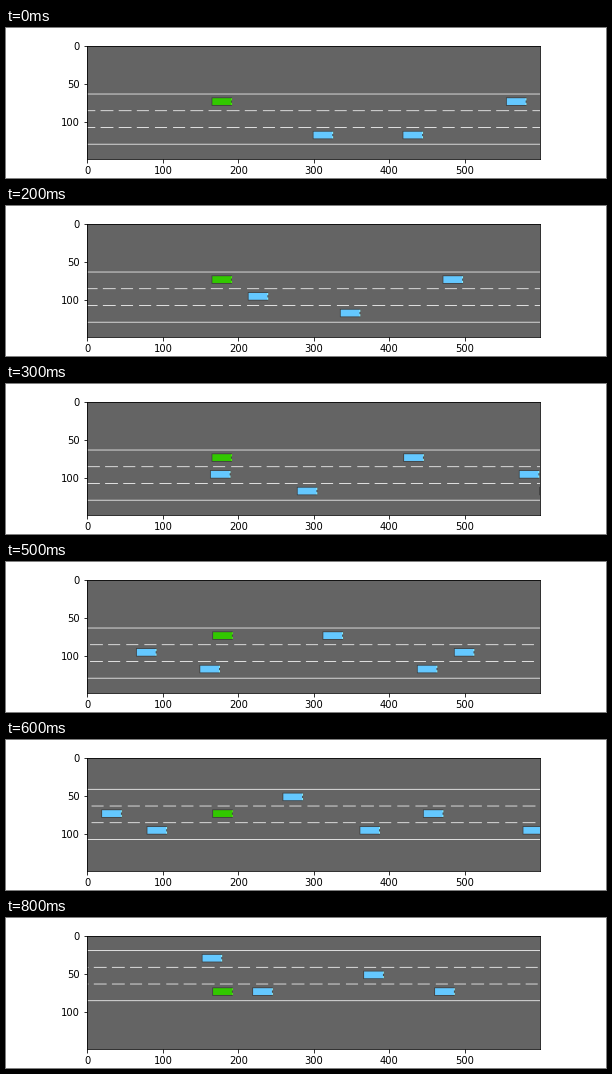
Write a matplotlib script that moves like this. It is 600x150 px and loops after 0.9 s.

```python
import matplotlib.pyplot as plt
import numpy as np
from matplotlib.animation import FuncAnimation

W, H = 600, 150
FRAMES, STEP = 9, 100
LANE = 22
CAR_L, CAR_W = 27, 11
DASH, PERIOD = 16.5, 23.815
CRUISE = 165  # own distance per step, in pixels

ROAD, WHITE, OUTLINE = (100, 100, 100), (255, 255, 255), (60, 60, 60)
GREEN, BLUE = (50, 200, 0), (100, 200, 255)

# Traffic: lane, start, closing speed, acceleration
CARS = [
    (2, 299, 56.5, 0.95),
    (2, 418, 49.0, -1.95),
    (0, 555, 53.5, 0),
    (1, 689, 49.1, 0.7),
    (2, 842, 94.3, 1.67),
    (2, 903, 58.5, 0),
]

Y, X = np.mgrid[:H, :W]


def lag(t):
    """Distance lost while the green car picks up speed."""
    return 25 * (1 - np.exp(-1.3 * t))


def paint_car(img, left, cy, color, heading=0.0):
    dx, dy = X - (left + CAR_L // 2), Y - cy
    u = dx * np.cos(heading) + dy * np.sin(heading)
    v = dy * np.cos(heading) - dx * np.sin(heading)
    body = (abs(u) < CAR_L / 2) & (abs(v) < CAR_W / 2)
    inner = (abs(u) < CAR_L / 2 - 1) & (abs(v) < CAR_W / 2 - 1)
    lamps = body & (u > CAR_L / 2 - 1) & (abs(v) > 1.5) & (abs(v) < 4.5)
    img[body] = OUTLINE
    img[inner] = color
    img[lamps] = [min(int(c / 0.68), 255) for c in color]


def paint_road(img, top, travel):
    dashes = (np.arange(W) + travel) % PERIOD < DASH
    for k in range(4):
        img[top + k * LANE, dashes if k in (1, 2) else slice(None)] = WHITE


def scene(t):
    img = np.full((H, W, 3), ROAD, dtype=np.uint8)
    own_lane = int(np.clip(t - 5, 0, 2))
    top = 64 - LANE * own_lane
    paint_road(img, top, 6 + CRUISE * t - lag(t))
    for n, (lane, start, speed, acc) in enumerate(CARS):
        heading = 0.0
        if n == 0:  # the leading car merges one lane up
            shift = 1 - np.exp(-1.7 * t * t)
            lane -= shift
            heading = -1.05 * shift * (1 - shift)
        left = start - speed * t + acc * t * t + lag(t)
        paint_car(img, round(left), top + 10 + round(lane * LANE), BLUE, heading)
    paint_car(img, round(165.2 + 0.08 * t), 74, GREEN)
    return img


plt.rcParams.update({
    "font.family": "DejaVu Sans",
    "font.size": 7.2,
    "axes.linewidth": 0.576,
})
fig = plt.figure(figsize=(6, 1.5), dpi=100, facecolor="white")
ax = fig.add_axes([0.135, 0.125, 0.755, 0.755])
view = ax.imshow(scene(0))
ax.set_xticks(range(0, W, 100))
ax.set_yticks(range(0, H, 50))
ax.tick_params(width=0.576, length=2.52, pad=2.52)


def update(i):
    view.set_data(scene(i))
    return [view]


anim = FuncAnimation(fig, update, frames=FRAMES, interval=STEP,
                     init_func=lambda: update(0), repeat=True, repeat_delay=0)
plt.show()
```
